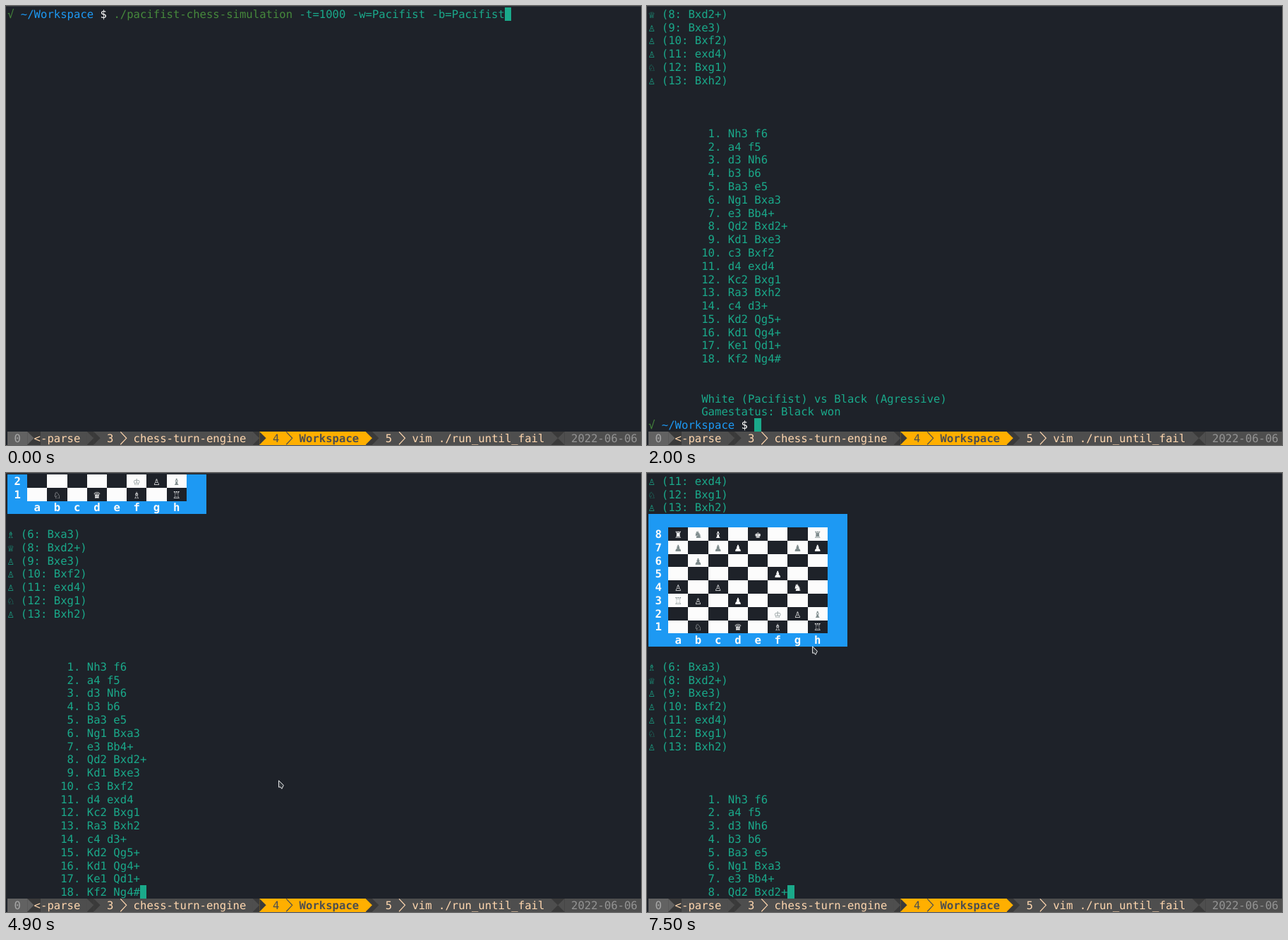
An HTML page that plays this animation: 900 px wide and 622 px high, repeating every 8 s.

```html
<!DOCTYPE html>
<html lang="en">
<head>
<meta charset="utf-8">
<title>Pacifist chess simulation</title>
<style>
  html, body { margin: 0; width: 100%; height: 100%; overflow: hidden; background: #1e2229; }
  svg { display: block; width: 100%; height: 100%; }
  rect { shape-rendering: crispEdges; }
  text {
    font: 15.613px "DejaVu Sans Mono", monospace;
    white-space: pre;
    text-rendering: geometricPrecision;
  }
  .b { font-weight: bold; }
</style>
</head>
<body>
<svg id="stage" viewBox="0 0 900 622" xmlns="http://www.w3.org/2000/svg"></svg>
<script>
const LOOP = 8000, CW = 9.4, RH = 18.78, PAD = 2, BASE = 14.9, ROWS = 32;
const BG = '#1e2229', TEAL = '#1aa98a', BLUE = '#1d99f3', WHITE = '#fcfcfc',
      GREY = '#7f8c8d', GREEN = '#46893c';
const X = col => +(PAD + col * CW).toFixed(2);
const Y = row => +(PAD + row * RH).toFixed(2);

const text = (col, row, str, fill = TEAL, cls = '') =>
  `<text x="${X(col)}" y="${(Y(row) + BASE).toFixed(2)}" fill="${fill}" class="${cls}">` +
  str.replace(/</g, '&lt;') + '</text>';
const cells = (col, row, w, h, fill) =>
  `<rect x="${X(col)}" y="${Y(row)}" width="${w * CW}" height="${h * RH}" fill="${fill}"/>`;
const block = (col, row) => cells(col, row, 1, 1, TEAL);
const prompt = row => text(0, row, '√', GREEN) + text(2, row, '~/Workspace', BLUE) +
  text(14, row, '$', WHITE);

// Game
const SAN = ('Nh3 f6,a4 f5,d3 Nh6,b3 b6,Ba3 e5,Ng1 Bxa3,e3 Bb4+,Qd2 Bxd2+,Kd1 Bxe3,c3 Bxf2,' +
  'd4 exd4,Kc2 Bxg1,Ra3 Bxh2,c4 d3+,Kd2 Qg5+,Kd1 Qg4+,Ke1 Qd1+,Kf2 Ng4#').split(',');
const PATHS = ('g1h3 f7f6 a2a4 f6f5 d2d3 g8h6 b2b3 b7b6 c1a3 e7e5 h3g1 f8a3 e2e3 a3b4 ' +
  'd1d2 b4d2 e1d1 d2e3 c2c3 e3f2 d3d4 e5d4 d1c2 f2g1 a1a3 g1h2 c3c4 d4d3 ' +
  'c2d2 d8g5 d2d1 g5g4 d1e1 g4d1 e1f2 h6g4').split(' ');

function play(turns) {
  const at = {}, taken = [];
  [...'abcdefgh'].forEach((f, i) => {
    at[f + 8] = '♜♞♝♛♚♝♞♜'[i];
    at[f + 7] = '♟';
    at[f + 2] = '♙';
    at[f + 1] = '♖♘♗♕♔♗♘♖'[i];
  });
  PATHS.slice(0, turns * 2).forEach((p, i) => {
    const from = p.slice(0, 2), to = p.slice(2), n = i >> 1;
    if (at[to]) taken.push(`${at[to]} (${n + 1}: ${SAN[n].split(' ')[1]})`);
    at[to] = at[from];
    delete at[from];
  });
  return { at, taken };
}

// A line is a function from its screen row to markup.
const blank = () => '';
const plain = (str, col = 0) => row => text(col, row, str);

function boardLines(at) {
  const blue = row => cells(0, row, 30, 1, BLUE);
  const rank = (_, r) => row => {
    let s = blue(row) + cells(3, row, 24, 1, BG) + text(1, row, `${8 - r}`, WHITE, 'b');
    [...'abcdefgh'].forEach((f, c) => {
      const light = (r + c) % 2, piece = at[f + (8 - r)];
      if (light) s += cells(3 + c * 3, row, 3, 1, WHITE);
      if (piece) s += text(4 + c * 3, row, piece, light ? GREY : WHITE);
    });
    return s;
  };
  const files = row => blue(row) +
    [...'abcdefgh'].map((f, c) => text(4 + c * 3, row, f, WHITE, 'b')).join('');
  return [blue, ...Array.from({ length: 8 }, rank), files];
}

// Screens
const show = lines => lines.map((line, row) => line(row)).join('');

function typed(player) {
  const args = ' -t=1000 -w=Pacifist -b=' + player;
  return prompt(0) + text(16, 0, './pacifist-chess-simulation', GREEN) +
    text(43, 0, args) + block(43 + args.length, 0);
}

function turn(n) {
  const { at, taken } = play(n);
  return show([...boardLines(at), blank, ...taken.map(s => plain(s))]) +
    block(0, 13 + taken.length);
}

const end = play(SAN.length);
const taken = end.taken.map(s => plain(s));
const log = [
  ...taken.slice(-3), ...boardLines(end.at), blank, ...taken, blank, blank, blank,
  ...SAN.map((s, i) => plain(`${i + 1}.`.padStart(3) + ' ' + s, 8)),
  blank, blank,
  plain('White (Pacifist) vs Black (Agressive)', 8),
  plain('Gamestatus: Black won', 8),
  prompt
];
const view = (top, col) => show(log.slice(top, top + ROWS)) + block(col, ROWS - 1);

const SCREENS = [
  [0, typed('Pacifist')], [500, typed('Agressive')],
  [1100, turn(2)], [1200, turn(4)], [1300, turn(6)],
  [1500, turn(8)], [1600, turn(10)], [1700, turn(12)], [1800, turn(14)], [1900, turn(16)],
  [2000, view(15, 16)], [4900, view(10, 20)], [5000, view(0, 21)]
];

// Status bar
function statusBar() {
  const R = ROWS, dark = '#3a3a3a', mid = '#4e4e4e', soft = '#626262',
        gold = '#ffaf00', cream = '#ffd7af';
  const y = Y(R), m = y + RH / 2, b = y + RH;
  const wedge = (col, fill, flip) => {
    const [p, q] = flip ? [X(col + 1), X(col)] : [X(col), X(col + 1)];
    return `<path d="M${p} ${y}L${q} ${m}L${p} ${b}Z" fill="${fill}"/>`;
  };
  const thin = (col, c) => `<path d="M${X(col) + .5} ${y + .5}L${X(col + 1) - .5} ${m}` +
    `L${X(col) + .5} ${b - .5}" fill="none" stroke="${c}" stroke-width="1.2"/>`;
  const tab = (col, num, name, bg, fg, cls) => {
    const w = name.length + 7;
    return cells(col, R, w, 1, bg) + wedge(col, dark) +
      text(col + 2, R, num, fg) + thin(col + 4, fg) + text(col + 6, R, name, fg, cls) +
      cells(col + w, R, 1, 1, dark) + wedge(col + w, bg);
  };
  return cells(0, R, 96, 1, dark) +
    cells(0, R, 3, 1, soft) + text(1, R, '0', '#a8a8a8') + wedge(3, soft) +
    cells(5, R, 7, 1, mid) + text(4, R, '<-parse', cream) + wedge(12, mid) +
    tab(13, '3', 'chess-turn-engine', mid, cream) +
    tab(38, '4', 'Workspace', gold, mid, 'b') +
    tab(55, '5', 'vim ./run_until_fail', mid, cream) +
    cells(84, R, 12, 1, mid) + wedge(83, mid, true) + text(85, R, '2022-06-06', '#949494');
}

// Pointer: [first step, step count, x, y]; one step each 100 ms
const MOVES = [
  [3500, 1, 882.5, 133], [3600, 7, 178, 509], [4400, 2, 386, 435], [5500, 5, 197, 295],
  [6100, 6, 154, 270], [6900, 2, 244, 249], [7200, 2, 234, 246], [7500, 1, 234, 245]
];

function pointerAt(t) {
  let pos = null;
  for (const [start, n, x, y] of MOVES) {
    if (t < start) break;
    const k = Math.min(n, Math.floor((t - start) / 100) + 1) / n;
    const e = (1 - Math.cos(Math.PI * k)) / 2;
    pos = pos ? [pos[0] + (x - pos[0]) * e, pos[1] + (y - pos[1]) * e] : [x, y];
  }
  return pos;
}

const stage = document.getElementById('stage');
stage.innerHTML = `<rect width="900" height="622" fill="${BG}"/>` +
  '<rect width="900" height="1" fill="#35393e"/>' +
  SCREENS.map(([, body]) => `<g class="screen" display="none">${body}</g>`).join('') +
  statusBar() +
  '<path id="pointer" d="M.6 .8V10.2L2.9 9.9L4.9 12.4L7.4 7.4Z" fill="#31363b" ' +
  'stroke="#eff0f1" stroke-width="1" stroke-linejoin="round"/>';
const groups = [...stage.querySelectorAll('.screen')];
const pointer = document.getElementById('pointer');

function draw(now) {
  const t = now % LOOP;
  const current = SCREENS.filter(([start]) => start <= t).length - 1;
  groups.forEach((g, i) => g.setAttribute('display', i === current ? 'inline' : 'none'));
  const pos = pointerAt(t);
  pointer.setAttribute('display', pos ? 'inline' : 'none');
  if (pos) pointer.setAttribute('transform', `translate(${pos[0]} ${pos[1]})`);
}

const began = performance.now();
function tick() {
  draw(performance.now() - began);
  requestAnimationFrame(tick);
}
tick();
</script>
</body>
</html>
```
